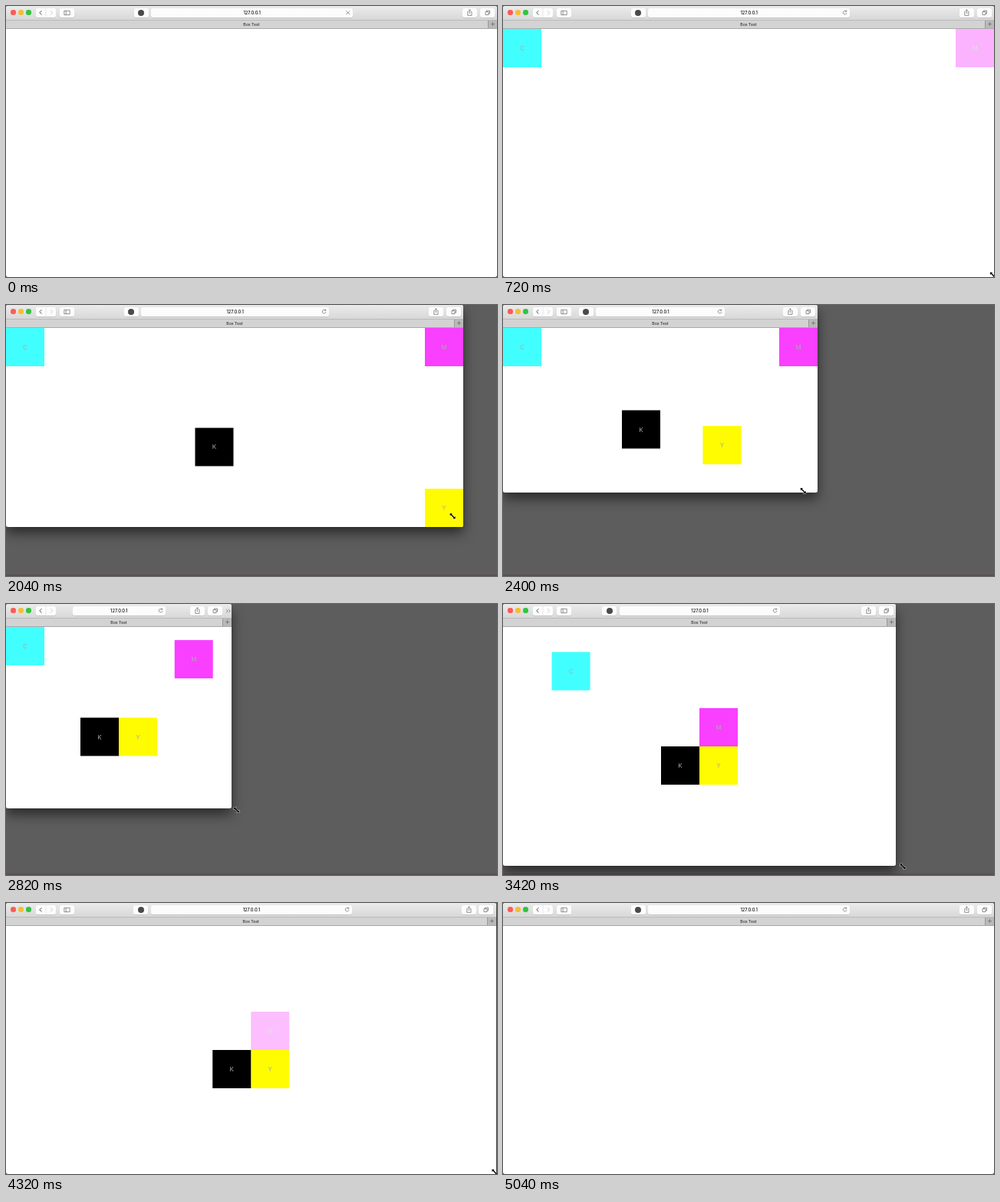
Write an HTML page that moves like this. It is 640 by 354 pixels and loops after 5.1 s.

```html
<!DOCTYPE html>
<html lang="en">
<head>
<meta charset="utf-8">
<title>Box Test</title>
<style>
  html, body { margin: 0; width: 100%; height: 100%; overflow: hidden; }
  body { position: relative; background: #5d5d5d; font-family: Inter, Roboto, "Liberation Sans", sans-serif; }
  body::before { content: ""; position: absolute; left: 0; right: 0; bottom: 0; height: 2px; background: #5b4e51; }
  #win {
    position: absolute; left: 0; top: 0; overflow: hidden; background: #fff;
    border-radius: 2.5px; box-shadow: 0 8px 16px rgba(0, 0, 0, .55), 0 0 1px rgba(0, 0, 0, .6);
  }
  #bar, #tabs, #address, .btn, .box, #plus, #tools, .light, svg { position: absolute; }
  #bar { left: 0; right: 0; top: 0; height: 18px; background: linear-gradient(#ebebeb, #d8d8d8); }
  #tabs {
    left: 0; right: 0; top: 18px; height: 12px; box-sizing: border-box;
    border-top: 1px solid #bababa; border-bottom: 1px solid #a9a9a9; background: #d3d3d3;
    font: 500 5.2px/10.6px Inter, Roboto, sans-serif; color: #333; text-align: center;
  }
  #plus { right: 0; top: 0; width: 11px; height: 10px; border-left: 1px solid #999; background: #b9b9b9; }
  .light { top: 5.4px; width: 6.4px; height: 6.4px; border-radius: 50%; }
  .btn, #address { top: 3px; height: 11.5px; border-radius: 2px; background: #fcfcfc; box-shadow: 0 .5px .5px rgba(0, 0, 0, .22); }
  .btn { width: 19px; }
  #address {
    left: 29.6%; width: 41%;
    font: 500 5.75px/12.4px Inter, Roboto, sans-serif; color: #111; text-align: center;
  }
  #ext { left: calc(29.6% - 22.5px); }
  #ext::after {
    content: ""; position: absolute; left: 5.5px; top: 2px; width: 8px; height: 8px;
    border-radius: 50%; background: #4a4a4a;
  }
  #tools { top: 0; width: 45px; height: 18px; }
  svg { left: 0; top: 0; overflow: visible; fill: none; stroke: #666; stroke-width: .7; }
  #status { left: auto; right: 3px; top: 2.2px; }
  #more { left: 47px; top: 6px; }
  .box { left: 0; top: 0; width: 50px; height: 50px; font-size: 8px; line-height: 50px; text-align: center; color: #aaa; }
  #cursor { stroke-linejoin: round; }
</style>
</head>
<body>
<div id="win">
  <div id="bar">
    <i class="light" style="left:6.3px;background:#fc5b57"></i>
    <i class="light" style="left:16.3px;background:#f5bd35"></i>
    <i class="light" style="left:26.3px;background:#33c443"></i>
    <div class="btn" style="left:38.5px;width:26px">
      <svg width="26" height="12">
        <path d="M7.4 3.1 4.8 5.8 7.4 8.5" stroke="#444" stroke-width=".9"/>
        <path d="M13 0V11.5" stroke="#ddd"/>
        <path d="M19 3.1 21.6 5.8 19 8.5" style="stroke:#bbb"/>
      </svg>
    </div>
    <div class="btn" id="side" style="left:69.5px">
      <svg width="19" height="12"><path d="M5.8 3.3H13.2V8.6H5.8ZM8.2 3.3V8.6"/></svg>
    </div>
    <div class="btn" id="ext"></div>
    <div id="address">127.0.0.1
      <svg id="status" width="7" height="8">
        <path id="stop" d="M1.4 1.4 6 6M6 1.4 1.4 6"/>
        <path id="reload" d="M5.4 1.9A2.4 2.4 0 1 0 6 4.1M5.7.5V2.3H3.8"/>
      </svg>
    </div>
    <div id="tools">
      <div class="btn" style="left:0">
        <svg width="19" height="12"><path d="M8 4.4H6.8V9.3H12V4.4H10.8M9.4 7V1.7M7.9 3.2 9.4 1.7 10.9 3.2"/></svg>
      </div>
      <div class="btn" style="left:22.5px">
        <svg width="19" height="12"><path d="M7 4.5H11V8.5H7ZM8.5 4.5V3H12.5V7H11"/></svg>
      </div>
      <svg id="more" width="6" height="6"><path d="M0 .8 2.2 3 0 5.2M3 .8 5.2 3 3 5.2"/></svg>
    </div>
  </div>
  <div id="tabs">Box Test
    <div id="plus"><svg width="11" height="10"><path d="M3 4.6H8M5.5 2.1V7.1"/></svg></div>
  </div>
  <div class="box" id="C" style="background:#41ffff">C</div>
  <div class="box" id="M" style="background:#f93fff">M</div>
  <div class="box" id="Y" style="background:#fffb00">Y</div>
  <div class="box" id="K" style="background:#000">K</div>
</div>
<svg id="cursor" width="8" height="8">
  <path d="M-3.5-3.5H-.3L-1.4-2.4 2.4 1.4 3.5.3V3.5H.3L1.4 2.4-2.4-1.4-3.5-.3Z" style="fill:#000;stroke:#fff;stroke-width:.8;paint-order:stroke"/>
</svg>
<script>
  const LOOP = 5100, STEP = 60, SIZE = 50, TOP = 30;
  const FADE = 290, FADE_IN = 305, FADE_OUT = 3854;
  const MOVE = 600, MOVE_START = 1470, MOVE_GAP = 575;

  // Window size over time, dragged by its lower right corner
  const widths = [[1680, 640], [1860, 636], [2040, 596], [2160, 544], [2400, 410], [2640, 306],
    [2760, 292], [2820, 294], [3000, 345], [3240, 447], [3420, 512], [3780, 612],
    [4020, 634], [4320, 638.5], [4860, 638.5], [4980, 640]];
  const heights = [[1680, 354], [1860, 330], [2040, 290], [2160, 251], [2400, 245], [2700, 252],
    [2820, 267], [3240, 321], [3420, 342], [3600, 354], [4980, 354]];

  const el = id => document.getElementById(id);
  const show = (id, on) => { el(id).style.visibility = on ? 'visible' : 'hidden'; };
  const place = (node, x, y) => { node.style.transform = `translate(${x}px, ${y}px)`; };
  const mix = (a, b, k) => a + (b - a) * k;

  function swing(t, start, length) {
    const p = Math.min(1, Math.max(0, (t - start) / length));
    return .5 - Math.cos(Math.PI * p) / 2;
  }

  // Smooth curve through [time, value] points
  function curve(points, t) {
    const last = points.length - 1;
    if (t <= points[0][0]) return points[0][1];
    if (t >= points[last][0]) return points[last][1];
    const i = points.findIndex(p => p[0] > t) - 1;
    const slope = j => {
      if (j <= 0 || j >= last) return 0;
      const [a, b, c] = [points[j - 1], points[j], points[j + 1]];
      if ((b[1] - a[1]) * (c[1] - b[1]) <= 0) return 0;
      return (c[1] - a[1]) / (c[0] - a[0]);
    };
    const [t0, v0] = points[i], [t1, v1] = points[i + 1];
    const d = t1 - t0, u = (t - t0) / d, e = u * u * (3 - 2 * u);
    return mix(v0, v1, e) + d * u * (1 - u) * ((1 - u) * slope(i) - u * slope(i + 1));
  }

  function draw(t) {
    const w = curve(widths, t), h = curve(heights, t);
    el('win').style.width = w + 'px';
    el('win').style.height = h + 'px';

    const narrow = w < 388;
    el('tools').style.right = narrow ? '9px' : '0';
    show('more', narrow);
    show('ext', !narrow);
    show('side', w > 308);
    show('stop', t < 300);
    show('reload', t >= 300);

    const cx = w / 2, cy = TOP + (h - TOP) / 2;
    ['C', 'M', 'Y', 'K'].forEach((id, i) => {
      const right = id === 'M' || id === 'Y', low = i > 1;
      const k = swing(t, MOVE_START + MOVE_GAP * (3 - i), MOVE);
      const x = mix(right ? w - SIZE : 0, right ? cx : cx - SIZE, k);
      const y = mix(low ? h - SIZE : TOP, low ? cy : cy - SIZE, k);
      place(el(id), x, y);
      el(id).style.opacity = swing(t, FADE_IN + FADE * i, FADE) - swing(t, FADE_OUT + FADE * i, FADE);
    });

    // The pointer runs slightly ahead of the window corner
    const lead = t + 35;
    place(el('cursor'), curve(widths, lead) - 1.5, curve(heights, lead) - 2.5);
    show('cursor', t >= 540 && t < 4980);
  }

  const begin = performance.now();
  function tick() {
    const t = (performance.now() - begin) % LOOP;
    draw(Math.floor(t / STEP) * STEP);
    requestAnimationFrame(tick);
  }
  tick();
</script>
</body>
</html>
```
